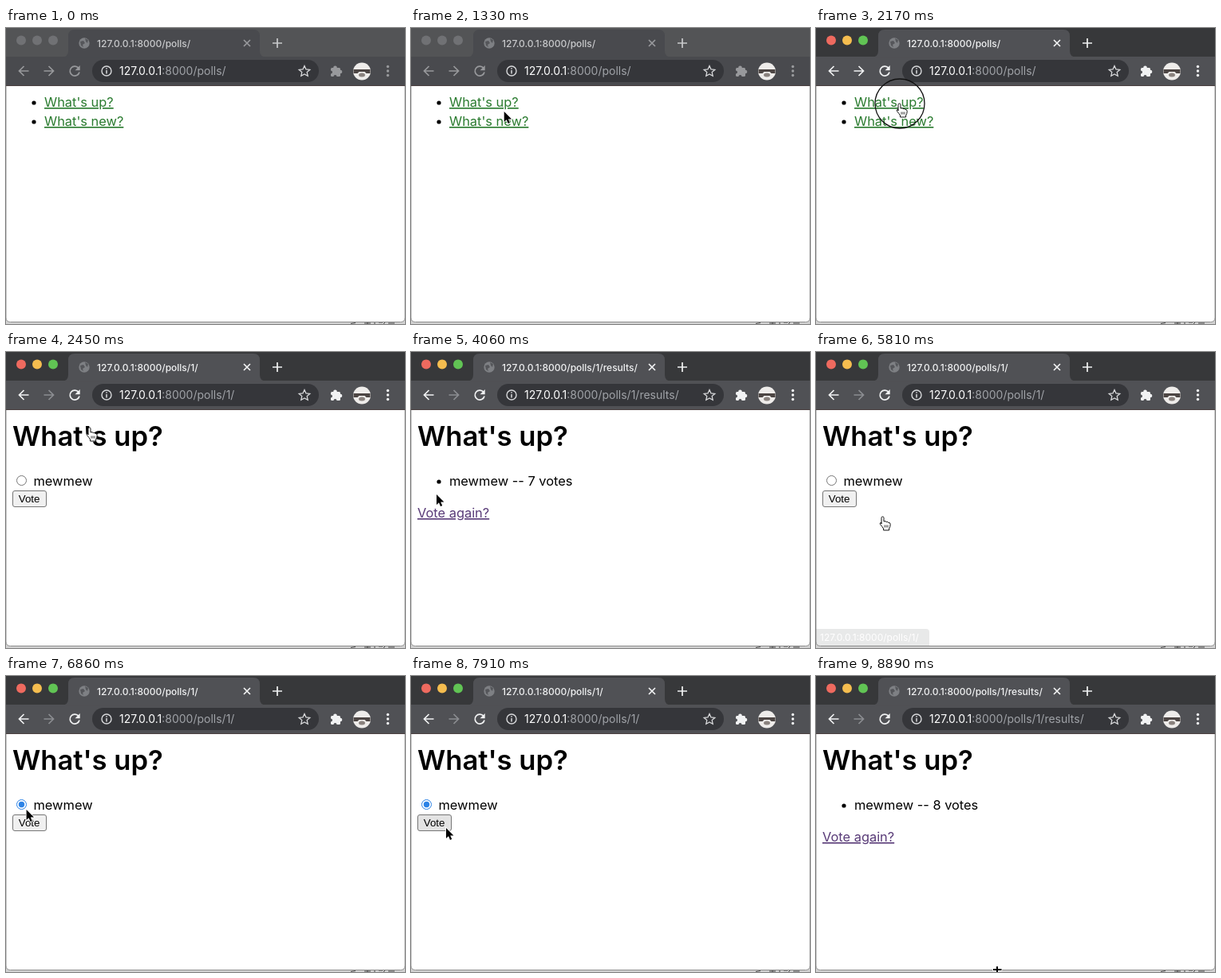
An HTML page for the animation above (8960 ms loop, 500 by 372 pixels).

```html
<!DOCTYPE html>
<html lang="en">
<head>
<meta charset="utf-8">
<title>Polls</title>
<style>
html, body { margin: 0; width: 100%; height: 100%; overflow: hidden; background: #fff; }
svg {
  display: block; width: 500px; height: 372px;
  font-family: Inter, "Noto Sans", sans-serif; font-size: 16.4px;
  font-optical-sizing: none;
  --strip: #37383a; --bar: #505155; --pill: #35363a;
  --icon: #f1f2f3; --dim: #8b8d91; --title: #f1f2f3;
  --red: #ee6a5f; --yellow: #f5bd4f; --green: #61c454;
}
svg.off {
  --strip: #535456; --bar: #494a4e; --icon: #98999c; --title: #c9cacc;
  --red: #707174; --yellow: #707174; --green: #707174;
}
.line { fill: none; stroke: var(--icon); stroke-width: 1.7; }
.fill { fill: var(--icon); }
.link { text-decoration: underline; text-decoration-thickness: 1px; fill: #2a7b2f; }
h1, .head { font-size: 34.6px; font-weight: 600; }
.tab { font-size: 12px; font-weight: 500; fill: var(--title); }
.url { font-size: 14px; fill: #a0a3a8; }
.url .host { fill: #fff; }
.button { font: 13.33px "Liberation Sans", Arial, sans-serif; }
</style>
</head>
<body>
<svg id="stage" viewBox="0 0 500 372">
  <rect width="500" height="372" fill="#d2d2d2"/>
  <path d="M432 371.5l6-1M449 371h8m-4-1v2M462 370v2m5-2h5m3 0l-2 2m6-1h8" stroke="#444" fill="none"/>
  <path d="M0 60H500V364q0 5.500-5.500 5.500H5.500Q0 369.500 0 364z" fill="#fff" stroke="#8d8d8d"/>

  <g id="chrome">
    <rect width="500" height="40" fill="var(--strip)"/>
    <rect y="36" width="500" height="36" fill="var(--bar)"/>
    <rect y="72" width="500" height="1" fill="#4b4040"/>
    <path d="M70 36.500q8 0 8-8V10q0-8 8-8H310q8 0 8 8v18.500q0 8 8 8z" fill="var(--bar)"/>
    <circle cx="19" cy="15.500" r="6" fill="var(--red)"/>
    <circle cx="39" cy="15.500" r="6" fill="var(--yellow)"/>
    <circle cx="59" cy="15.500" r="6" fill="var(--green)"/>

    <circle cx="98" cy="19" r="6.700" fill="#7e8084"/>
    <path d="M93 17l4-1 2 3-3 2 1 3-3-2zM99 13l4 2-1 4-2-2z" fill="#55565a"/>
    <text class="tab" x="114" y="23.500">127.0.0.1:8000/polls/<tspan class="path"></tspan></text>
    <path class="line" d="M298 15l8 8m0-8l-8 8"/>
    <path class="line" d="M334 19h12m-6-6v12" style="stroke:var(--title)"/>

    <path class="line" d="M28.500 54H16.500m6-6l-6 6 6 6"/>
    <path class="line" id="forward" d="M47.500 54h12m-6-6l6 6-6 6"/>
    <path class="line" d="M91 50.500A6 6 0 1 0 92 55.500"/>
    <path class="fill" d="M92.700 47v6.200h-6.200z"/>

    <rect x="108" y="40" width="284" height="28" rx="14" fill="var(--pill)"/>
    <g style="--icon:#d8d9db">
      <circle class="line" cx="126" cy="54" r="6" style="stroke-width:1.400"/>
      <path class="line" d="M126 53v4.500m0-7.300v1.600" style="stroke-width:1.500"/>
      <path class="line" style="stroke-width:1.300" d="M374 47.500l2 4.400 4.800.5-3.600 3.200 1 4.700-4.200-2.400-4.200 2.400 1-4.700-3.600-3.200 4.800-.5z"/>
    </g>
    <text class="url" x="142" y="59"><tspan class="host">127.0.0.1</tspan>:8000/polls/<tspan class="path"></tspan></text>

    <rect class="fill" x="407" y="50" width="12" height="11" rx="1.500"/>
    <circle class="fill" cx="412.500" cy="49.800" r="2.300"/>
    <circle class="fill" cx="419" cy="55" r="2.300"/>
    <circle cx="407" cy="55.500" r="2" fill="var(--bar)"/>
    <circle cx="412.500" cy="61" r="2" fill="var(--bar)"/>

    <circle cx="446" cy="54.500" r="11" fill="#eeecea"/>
    <path d="M435.500 52h21v5h-5l-2-2h-7l-2 2h-5z" fill="#4d4644"/>
    <ellipse cx="446" cy="59" rx="4" ry="2.500" fill="#8a827e"/>
    <circle class="fill" cx="478.500" cy="48.500" r="1.700"/>
    <circle class="fill" cx="478.500" cy="54" r="1.700"/>
    <circle class="fill" cx="478.500" cy="59.500" r="1.700"/>
  </g>

  <g id="list">
    <circle cx="35" cy="94" r="2.600"/>
    <text class="link" x="48" y="99">What's up?</text>
    <circle cx="35" cy="118" r="2.600"/>
    <text class="link" x="48" y="123">What's new?</text>
  </g>

  <text id="head" class="head" x="8" y="118">What's up?</text>

  <g id="detail">
    <circle id="radio" cx="19.500" cy="161.500" r="6" fill="#fff" stroke="#767676"/>
    <circle id="dot" cx="19.500" cy="161.500" r="3.700" fill="#2b82e6"/>
    <text x="34.500" y="168">mewmew</text>
    <rect id="vote" x="8.500" y="174.500" width="42" height="20" rx="2.500" stroke="#767676"/>
    <text class="button" x="15.800" y="189">Vote</text>
  </g>

  <g id="results">
    <circle cx="35" cy="163" r="2.600"/>
    <text x="48" y="168">mewmew -- <tspan id="count"></tspan> votes</text>
    <text class="link" x="8" y="208" style="fill:#593b78">Vote again?</text>
  </g>

  <g id="status">
    <path d="M0 348H138q4 0 4 4v17H4q-4 0-4-4z" fill="#3c3d40"/>
    <text x="5" y="363" font-size="12" fill="#fff">127.0.0.1:8000/polls/1/</text>
  </g>

  <g id="pointer">
    <circle id="ring" r="31" fill="none" stroke="#111" stroke-width="1.300"/>
    <path id="arrow" d="M0 0v13l3-2.800 2 4.800 2.200-.9-2-4.700h4.200z" stroke="#fff" stroke-width="1.600" paint-order="stroke"/>
    <g id="hand" fill="#fff" stroke="#111" stroke-linejoin="round">
      <path d="M-2 1.500q0-1.600 1.500-1.600t1.500 1.600v4.500q2.400-1 3.200.6 2-.6 2.600.8 2.400-.2 2.400 2.200 0 3-1.600 5.400v2h-7v-2q-1.600-2.600-4.200-5.600-.8-1.600.8-2 1.200 0 .8 1.600z"/>
      <path d="M2 10.500v3m2-3v3m2-3v3" stroke-width=".8"/>
    </g>
    <path id="resize" d="M-5-1h4v-3h2v3h4.500v2h-4.500v4h-2v-4h-4z" stroke="#fff" stroke-width="1.600" paint-order="stroke"/>
  </g>
</svg>
<script>
const LOOP = 8960, STEP = 70;
const $ = id => document.getElementById(id);
const show = (id, on) => { $(id).style.display = on ? "" : "none"; };
const within = (t, a, b) => t >= a && t < b;
const clamp = v => Math.max(0, Math.min(1, v));
const ease = p => p * p * (3 - 2 * p);

// first moved step, arrival, x, y, pointer shape
const moves = [
  [350, 490, 183, 190, "arrow"],
  [700, 770, 183, 183, "arrow"],
  [1120, 1400, 109, 96, "arrow"],
  [1960, 1960, 105, 95, "hand"],
  [2730, 3080, 20, 164, "arrow"],
  [3570, 3780, 32, 179, "arrow"],
  [4200, 4550, 145, 261, "arrow"],
  [4970, 5320, 84, 207, "arrow"],
  [5390, 5390, 84, 207, "hand"],
  [6020, 6370, 20, 164, "arrow"],
  [6860, 7210, 95, 220, "arrow"],
  [7280, 7700, 38, 188, "arrow"],
  [7770, 7840, 44, 191, "arrow"],
  [8050, 8400, 196, 299, "arrow"],
  [8610, 8750, 226, 352, "arrow"],
  [8820, 8890, 227, 369, "resize"]
];

// start time, view, path suffix, votes
const pages = [
  [0, "list", ""],
  [2380, "detail", "1/"],
  [3920, "results", "1/results/", 7],
  [5600, "detail", "1/"],
  [7980, "results", "1/results/", 8]
];

function pointerAt(t) {
  let x = 241, y = 357, shape = "";
  for (const [from, to, tx, ty, kind] of moves) {
    if (t < from) break;
    const start = from - STEP;
    const p = ease(clamp((t - start) / (to - start)));
    x += (tx - x) * p;
    y += (ty - y) * p;
    shape = kind;
  }
  return { x, y, shape };
}

function statusAt(t) {
  if (within(t, 2240, 2450)) return t < 2380 ? 0.6 : 0.2;
  if (within(t, 5390, 5880)) return Math.min(clamp((t - 5320) / 140), clamp((5880 - t) / 280) ** 1.6);
  return 0;
}

function draw(t) {
  const [, view, path, votes] = pages.filter(p => p[0] <= t).pop();
  $("stage").classList.toggle("off", t < 1680);
  for (const id of ["list", "detail", "results"]) show(id, id === view);
  show("head", view !== "list");
  for (const el of document.querySelectorAll(".path")) el.textContent = path;
  $("count").textContent = votes || "";
  $("forward").style.stroke = view === "list" ? "" : "var(--dim)";

  const checked = within(t, 3220, 3920) || within(t, 6510, 7980);
  show("dot", checked);
  $("radio").setAttribute("stroke", checked ? "#2b82e6" : "#767676");
  const hover = within(t, 3780, 3920) || within(t, 7700, 7980);
  $("vote").setAttribute("fill", hover ? "#e3e3e3" : "#f0f0f0");

  $("status").style.opacity = statusAt(t);

  const { x, y, shape } = pointerAt(t);
  $("pointer").setAttribute("transform", `translate(${x.toFixed(1)} ${y.toFixed(1)})`);
  for (const id of ["arrow", "hand", "resize"]) show(id, id === shape);
  show("ring", within(t, 1610, 1680) || within(t, 2170, 2240));
}

const origin = performance.now();
function tick() {
  const t = (performance.now() - origin) % LOOP;
  draw(Math.floor(t / STEP) * STEP);
  requestAnimationFrame(tick);
}
tick();
</script>
</body>
</html>
```
